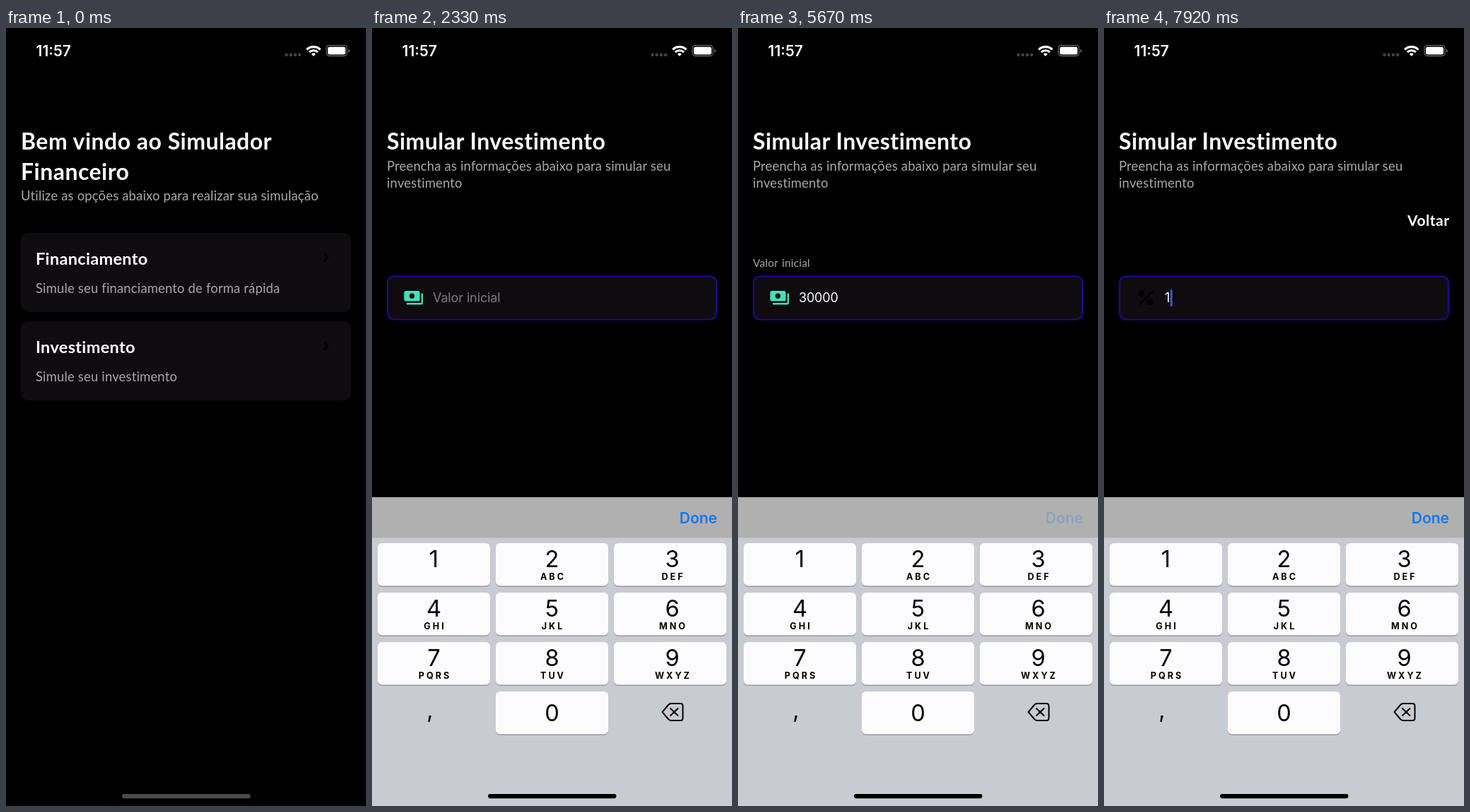
Recreate the animation shown at these times as an HTML page. Size 509 by 1101 pixels, loop 8000 ms.

```html
<!DOCTYPE html>
<html lang="pt-BR">
<head>
<meta charset="utf-8">
<title>Simulador Financeiro</title>
<style>
html, body { margin: 0; width: 100%; height: 100%; overflow: hidden; background: #000; }
svg { display: block; width: 100vw; height: 100vh; }

/* Type */
text { font: 18px Inter, sans-serif; fill: #fff; white-space: pre; }
.title, .head, .sub, .label, .back { font-family: Lato, sans-serif; }
.title { font-size: 32px; font-weight: 700; letter-spacing: .47px; }
.head { font-size: 23.5px; font-weight: 700; letter-spacing: .32px; }
.sub { font-size: 18.4px; letter-spacing: .2px; fill: #a8a8a8; }
.label { font-size: 15.5px; letter-spacing: .2px; word-spacing: 1px; fill: #a8a8a8; }
.back { font-size: 21px; font-weight: 700; letter-spacing: .5px; text-anchor: end; }
.hint { fill: #7c7b7e; letter-spacing: -.12px; }
.value { letter-spacing: -.2px; }
.clock { font-size: 21px; font-weight: 600; }
.digit { font-size: 32.6px; text-anchor: middle; fill: #000; }
.letters { font-size: 12.6px; font-weight: 700; letter-spacing: 3px; text-anchor: middle; fill: #000; }
.done { font-size: 21px; font-weight: 600; text-anchor: end; fill: #0a7aff; }

/* Shapes */
.card { fill: #0e0c0f; }
.line { fill: none; stroke: #000; stroke-width: 2; stroke-linecap: round; stroke-linejoin: round; }
.thick { stroke-width: 2.8; }
.focus { fill: none; stroke: #1f0b8c; stroke-width: 2.2; }
.caret { fill: #4a68dc; }
.key { fill: #fcfcfe; }
.shade { fill: #8a8c91; }

/* Page push */
#home { animation: home 8s cubic-bezier(.283, .99, .318, .99) infinite; }
@keyframes home {
  0%, 7.875% { transform: none; opacity: 1; }
  15.375%, 100% { transform: translateX(-152.7px); opacity: .9; }
}
#form { animation: form 8s cubic-bezier(.283, .99, .318, .99) infinite; }
@keyframes form {
  0%, 7.875% { transform: translateX(509px); }
  15.375%, 100% { transform: none; }
}

/* First field */
#amount { animation: amount 8s step-end infinite; }
@keyframes amount { 0% { visibility: visible; } 72.25%, 100% { visibility: hidden; } }
#amountFocus { animation: amountFocus 8s step-end infinite; }
@keyframes amountFocus { 0% { opacity: 0; } 19.7%, 100% { opacity: 1; } }
#amountHint { animation: amountHint 8s step-end infinite; }
@keyframes amountHint { 0% { opacity: 1; } 47.8%, 100% { opacity: 0; } }
#amountLabel { animation: amountLabel 8s step-end infinite; }
@keyframes amountLabel { 0% { opacity: 0; } 47.8%, 100% { opacity: 1; } }
.value tspan { animation: 8s step-end infinite; }
#d0 { animation-name: d0; }
#d1 { animation-name: d1; }
#d2 { animation-name: d2; }
#d3 { animation-name: d3; }
#d4 { animation-name: d4; }
@keyframes d0 { 0% { fill: transparent; } 47.8%, 100% { fill: #fff; } }
@keyframes d1 { 0% { fill: transparent; } 52.1%, 100% { fill: #fff; } }
@keyframes d2 { 0% { fill: transparent; } 54.1%, 100% { fill: #fff; } }
@keyframes d3 { 0% { fill: transparent; } 56.2%, 100% { fill: #fff; } }
@keyframes d4 { 0% { fill: transparent; } 58.3%, 100% { fill: #fff; } }
#amountCaret { animation: caretStep 8s step-end infinite, amountBlink 8s linear infinite; }
@keyframes caretStep {
  0% { transform: none; }
  47.8% { transform: translateX(11.3px); }
  52.1% { transform: translateX(22.6px); }
  54.1% { transform: translateX(33.9px); }
  56.2% { transform: translateX(45.2px); }
  58.3%, 100% { transform: translateX(56.5px); }
}
@keyframes amountBlink {
  0%, 19.7%, 29.125%, 31.25%, 41.625%, 43.75%, 66.625%, 100% { opacity: 0; }
  19.71%, 27.125%, 33.375%, 39.625%, 45.875%, 64.625% { opacity: 1; }
}

/* Second field */
#rate { animation: rate 8s cubic-bezier(.455, .03, .515, .955) infinite; }
@keyframes rate {
  0%, 72.425% { transform: translateX(32.6px); opacity: 0; }
  76.175%, 100% { transform: none; opacity: 1; }
}
#back { animation: back 8s cubic-bezier(.455, .03, .515, .955) infinite; }
@keyframes back {
  0%, 72.425% { transform: translateX(-32.6px); opacity: 0; }
  76.175%, 100% { transform: none; opacity: 1; }
}
#rateHint { animation: rateHint 8s step-end infinite; }
@keyframes rateHint { 0% { opacity: 1; } 98.9%, 100% { opacity: 0; } }
#rateValue { animation: rateValue 8s step-end infinite; }
@keyframes rateValue { 0% { opacity: 0; } 98.9%, 100% { opacity: 1; } }
#rateCaret { animation: rateStep 8s step-end infinite, rateBlink 8s linear infinite; }
@keyframes rateStep { 0% { transform: none; } 98.9%, 100% { transform: translateX(7.5px); } }
@keyframes rateBlink {
  0%, 79.125%, 85.375%, 91.625%, 97.875%, 100% { opacity: 1; }
  81.25%, 83.375%, 93.75%, 95.875% { opacity: 0; }
}

/* Keyboard */
#keyboard { animation: slideIn 8s cubic-bezier(.283, .99, .318, .99) infinite; }
@keyframes slideIn {
  0%, 20.21% { transform: translateX(509px); }
  27.71%, 100% { transform: none; }
}
#dip { animation: dip 8s linear infinite; }
@keyframes dip {
  0%, 71.5% { transform: none; }
  72.875% { transform: translateY(190px); }
  74% { transform: translateY(76.5px); }
  75% { transform: translateY(28px); }
  76% { transform: translateY(8px); }
  77.125%, 100% { transform: none; }
}
#bar { animation: bar 8s ease-out infinite; }
@keyframes bar {
  0%, 25% { transform: translateY(58px); }
  29.125%, 100% { transform: none; }
}
#tray { animation: tray 8s linear infinite; }
@keyframes tray { 0%, 25% { fill: #d0d3d9; } 29.125%, 100% { fill: #c8cbd2; } }
.done { animation: done 8s step-end infinite; }
@keyframes done { 0% { opacity: 1; } 69.7% { opacity: .25; } 71.875%, 100% { opacity: 1; } }
#key1 { animation: press1 8s step-end infinite; }
#key3 { animation: press3 8s step-end infinite; }
#key0 { animation: press0 8s step-end infinite; }
@keyframes press1 { 97.75% { fill: #adb8c7; } 98.9%, 100% { fill: #fcfcfe; } }
@keyframes press3 { 46.75% { fill: #adb8c7; } 47.8%, 100% { fill: #fcfcfe; } }
@keyframes press0 {
  51%, 53.1%, 55.2%, 57.2% { fill: #adb8c7; }
  0%, 52.1%, 54.1%, 56.2%, 61.5%, 100% { fill: #fcfcfe; }
}
#indicator { animation: indicator 8s step-end infinite; }
@keyframes indicator { 0% { fill: #4b4b4b; } 21.8%, 100% { fill: #000; } }
</style>
</head>
<body>
<svg viewBox="0 0 509 1101" preserveAspectRatio="none">
  <rect width="509" height="1101"/>

  <g id="home">
    <text class="title" x="21" y="172">Bem vindo ao Simulador</text>
    <text class="title" x="21" y="214.5">Financeiro</text>
    <text class="sub" x="21" y="244">Utilize as opções abaixo para realizar sua simulação</text>
    <rect class="card" x="21" y="290" width="467" height="112" rx="11"/>
    <text class="head" x="42" y="335">Financiamento</text>
    <text class="sub" x="42" y="374.5">Simule seu financiamento de forma rápida</text>
    <path class="line thick" d="M450 320l5 5-5 5"/>
    <rect class="card" x="21" y="415" width="467" height="112" rx="11"/>
    <text class="head" x="42" y="460">Investimento</text>
    <text class="sub" x="42" y="499.5">Simule seu investimento</text>
    <path class="line thick" d="M450 445l5 5-5 5"/>
  </g>

  <g id="form">
    <rect width="509" height="1101"/>
    <text class="title" x="21" y="172">Simular Investimento</text>
    <text class="sub" x="21" y="201.5">Preencha as informações abaixo para simular seu</text>
    <text class="sub" x="21" y="226">investimento</text>
    <text class="back" id="back" x="488.5" y="280">Voltar</text>

    <g id="amount">
      <text class="label" id="amountLabel" x="21" y="337.5">Valor inicial</text>
      <rect class="card" x="21" y="350.5" width="467" height="63" rx="10"/>
      <rect class="focus" id="amountFocus" x="22.1" y="351.5" width="464.8" height="61" rx="9"/>
      <g fill="#3fe2b9">
        <path fill-rule="evenodd" d="M48 372H65a2.6 2.6 0 0 1 2.6 2.6V384a2.6 2.6 0 0 1-2.6 2.6H48a2.6 2.6 0 0 1-2.6-2.6V374.6a2.6 2.6 0 0 1 2.6-2.6zM56.4 375.6a3.7 3.7 0 0 0 0 7.4 3.7 3.7 0 0 0 0-7.4z"/>
        <path d="M69.7 375.6H72V389a2.5 2.5 0 0 1-2.5 2.5H49V389H69.7z"/>
      </g>
      <text class="hint" id="amountHint" x="86" y="388">Valor inicial</text>
      <text class="value" x="86" y="388"><tspan id="d0">3</tspan><tspan id="d1">0</tspan><tspan id="d2">0</tspan><tspan id="d3">0</tspan><tspan id="d4">0</tspan></text>
      <rect class="caret" id="amountCaret" x="86" y="370" width="2.6" height="24" rx="1.2"/>
    </g>

    <g id="rate">
      <rect class="card" x="21" y="350.5" width="467" height="63" rx="10"/>
      <rect class="focus" x="22.1" y="351.5" width="464.8" height="61" rx="9"/>
      <path class="line thick" d="M68 373.5L51 390.5"/>
      <circle cx="53" cy="376" r="4.2"/>
      <circle cx="65" cy="388" r="4.2"/>
      <text class="hint" id="rateHint" x="86" y="388">Taxa de juros (Anual)</text>
      <text class="value" id="rateValue" x="86" y="388">1</text>
      <rect class="caret" id="rateCaret" x="86" y="370" width="2.6" height="24" rx="1.2"/>
    </g>
  </g>

  <g id="keyboard">
    <g id="dip">
      <g id="bar">
        <rect y="664" width="509" height="60" fill="#b1b0b0"/>
        <text class="done" x="488" y="700.5">Done</text>
      </g>
      <rect id="tray" y="721.5" width="509" height="380"/>
      <g id="keys"></g>
      <text class="digit" x="82" y="976">,</text>
      <path class="line" d="M410.5 968L419 958Q420.5 956 423 956H436Q439.5 956 439.5 959.5V976.5Q439.5 980 436 980H423Q420.5 980 419 978ZM422 963L432.5 973M432.5 963L422 973"/>
    </g>
  </g>

  <text class="clock" x="42.5" y="40.2">11:57</text>
  <g fill="#434343">
    <circle cx="396.5" cy="38" r="2.3"/><circle cx="402.7" cy="38" r="2.3"/>
    <circle cx="408.9" cy="38" r="2.3"/><circle cx="415.1" cy="38" r="2.3"/>
  </g>
  <g fill="none" stroke="#fff" stroke-width="3.2">
    <path d="M425.2 30.6a13.8 13.8 0 0 1 19.2 0"/>
    <path d="M428.7 34.2a8.8 8.8 0 0 1 12.2 0"/>
    <path d="M434.8 40l-3-3a4.3 4.3 0 0 1 6 0z" fill="#fff" stroke="none"/>
  </g>
  <rect x="453" y="24.7" width="29" height="14.8" rx="4.2" fill="none" stroke="#6a6a6a" stroke-width="1.3"/>
  <rect x="455" y="26.7" width="25" height="10.8" rx="2.5" fill="#fff"/>
  <path d="M484 29.8q1.8 .5 1.8 2.5t-1.8 2.5z" fill="#6a6a6a"/>
  <rect id="indicator" x="164" y="1084" width="181.5" height="6.2" rx="3.1"/>
</svg>
<script>
const letters = ["", "ABC", "DEF", "GHI", "JKL", "MNO", "PQRS", "TUV", "WXYZ"];
const nudge = [0, 0, 3];

function keyCap(digit, col, row) {
  const x = 8 + 167 * col, y = 729 + 70 * row, mid = x + 79.5 + nudge[col];
  const name = letters[digit - 1];
  return `<rect class="shade" x="${x}" y="${y + 1.3}" width="159" height="60.5" rx="6"/>
    <rect class="key" id="key${digit}" x="${x}" y="${y}" width="159" height="60.5" rx="6"/>
    <text class="digit" x="${mid}" y="${y + (digit ? 33.5 : 41.5)}">${digit}</text>
    ${name ? `<text class="letters" x="${mid + 1.5}" y="${y + 51.5}">${name}</text>` : ""}`;
}

const caps = letters.map((_, i) => keyCap(i + 1, i % 3, Math.floor(i / 3)));
document.getElementById("keys").innerHTML = caps.join("") + keyCap(0, 1, 3);
</script>
</body>
</html>
```
